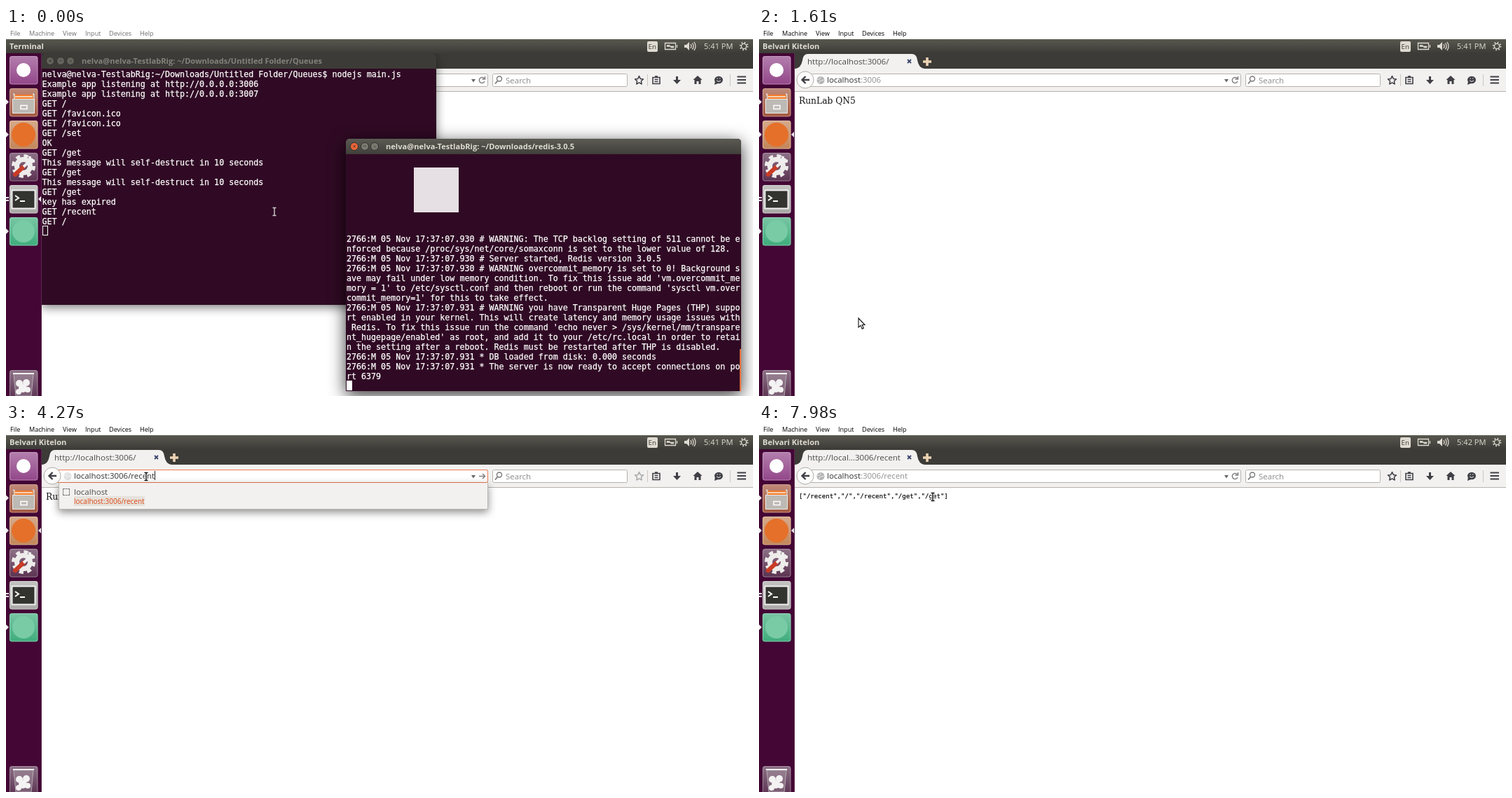
Recreate the animation shown at these times as an HTML page. Size 1066x525 px, loop 8 s.

```html
<!DOCTYPE html>
<html lang="en">
<head>
<meta charset="utf-8">
<title>Desktop session</title>
<style>
html, body { margin: 0; width: 100%; height: 100%; overflow: hidden; background: #fff; }
#stage { position: absolute; left: 0; top: 0; width: 1066px; height: 525px; overflow: hidden;
  font-family: "Open Sans", sans-serif; }
#stage > * { position: absolute; }
svg { left: 0; top: 0; display: block; }
.bold { font-weight: 700; }

.win { box-shadow: 0 4px 14px rgba(0,0,0,.5); background: #300a24; border-radius: 5px 5px 0 0; z-index: 1; }
.win.active { box-shadow: 0 6px 24px rgba(0,0,0,.8); z-index: 2; }
.bar { height: 22px; border-radius: 5px 5px 0 0; background: #3c3b37; color: #85827b;
  font: 700 11.1px/22px "Open Sans", sans-serif; white-space: pre; }
.active .bar { background: linear-gradient(#5b5a53, #403f3a); color: #dfdbd2; }
.bar span { position: absolute; left: 57px; top: 0; }
.bar i { position: absolute; top: 5px; width: 10px; height: 10px; border-radius: 50%;
  border: 1px solid #33322e; background: #65635c; font: 9px/9px "Open Sans", sans-serif;
  color: #33322e; text-align: center; }
.active .bar i { background: #7b7970; }
.active .bar i:first-child { background: #ee6637; }
pre { position: relative; top: 1px; margin: 0; color: #fff; font: 11.67px/14px "DejaVu Sans Mono", monospace;
  -webkit-text-stroke: .25px; }
.cur { position: absolute; left: 1px; width: 6px; height: 12px; border: 1px solid #fff; }
.active .cur { background: #fff; }
.scroll { position: absolute; right: 0; bottom: 0; width: 2px; background: #8d8078; }
.active .scroll { background: #e9713c; }
.logo { position: absolute; left: 97px; top: 41px; width: 64px; height: 64px; background: #e6e0e4; }

#url { left: 97px; top: 65px; font-size: 11.45px; line-height: 18px; white-space: pre; color: #333; }
#url.idle .rest { color: #8f8f8f; }
#caret { display: inline-block; width: 1px; height: 13px; background: #222; vertical-align: -2px; }
#page { left: 57px; top: 97px; white-space: pre; color: #000; font: 9.07px/12px "DejaVu Sans Mono", monospace;
  -webkit-text-stroke: .15px; }
#list { left: 75px; top: 84px; width: 611px; background: #f2f1f0;
  border: 1px solid #bbb7b1; border-top: 0; box-shadow: 0 4px 12px rgba(0,0,0,.45); }
.row { position: relative; height: 37px; color: #4c4c4c; font-size: 11.5px; white-space: pre; }
.row::before { content: ""; position: absolute; left: 5px; top: 8px; width: 8px; height: 8px; border: 1px dashed #777; }
.row b, .row em { position: absolute; left: 21px; font-weight: 400; font-style: normal; }
.row b { top: 4px; line-height: 18px; }
.row em { top: 19px; font-size: 10px; line-height: 14px; color: #dd4814; }
.row mark { color: inherit; background: #e6e1db; }
#shell, #pointer { z-index: 5; }
</style>
</head>
<body>
<div id="stage">

<svg id="browser" width="1066" height="525" fill="none">
  <path fill="#fff" d="M51 36H1066V525H51Z"/>
  <path fill="#3c3b37" d="M51 36H1066V58H51Z"/>
  <path fill="#f2f1f0" d="M51 58H1066V90H51Z"/>
  <path stroke="#b8b4ae" d="M51 90.5H1066"/>
  <path fill="#f2f1f0" d="M52 58Q60 57 62 46Q63 37 70 37H218Q225 37 226 46Q228 57 236 58Z"/>
  <g font-size="11.6" fill="#4c4c4c">
    <text x="69" y="51.5" data-on="0-4410">http://localhost:3006/</text>
    <text x="69" y="51.5" data-on="4410-8000">http://local…3006/recent</text>
  </g>
  <path stroke="#39456b" stroke-width="1.8" d="M212 45l5 5m0-5l-5 5"/>
  <path stroke="#ecd3b4" stroke-width="3.6" d="M240 42v12M234 48h12"/>
  <rect x="60.5" y="65.5" width="627" height="18" rx="2" fill="#fff" stroke="#b6b2ac"/>
  <rect x="60.5" y="65.5" width="627" height="18" rx="2" stroke="#ee7b54" data-on="2310-4340"/>
  <circle cx="66" cy="74" r="12" fill="#fbfbfa" stroke="#b0aca6"/>
  <path stroke="#3f3f45" stroke-width="2.4" d="M72 74H62M66.5 69L61.5 74L66.5 79"/>
  <g id="globe">
    <circle cx="88" cy="74.5" r="5.5" fill="#b4b4b4"/>
    <path stroke="#ececec" d="M83 73q4 2 5-3M86 79q-1-4 3-4t4-2"/>
  </g>
  <path fill="#666" d="M664 73h6l-3 4.5z"/>
  <g stroke="#828282" stroke-width="1.5">
    <path d="M682.5 72A4 4 0 1 0 683 76M683.5 69v4h-4" data-on="0-3010 4340-8000"/>
    <path d="M675 74.5h8M680 71l3.5 3.5l-3.5 3.5" data-on="3010-4340"/>
  </g>
  <rect x="694.5" y="65.5" width="192" height="18" rx="2" fill="#fff" stroke="#b6b2ac"/>
  <circle cx="704" cy="72.5" r="3.5" stroke="#777" stroke-width="1.4"/>
  <path stroke="#777" stroke-width="1.8" d="M701.5 75.5l-3.5 4"/>
  <text x="713" y="78.7" font-size="11.5" fill="#8c8c8c">Search</text>
  <path id="star" stroke="#3f3f45" stroke-width="1.5" stroke-linejoin="round"
    d="M903.5 68.5l1.8 3.9 4.2.5-3.1 2.9.8 4.2-3.7-2.1-3.7 2.1.8-4.2-3.1-2.9 4.2-.5z"/>
  <path stroke="#ccc8c2" d="M915.5 66v17M1033.5 66v17"/>
  <g stroke="#3f3f45" stroke-width="1.6">
    <path d="M923 70.5h10v9h-10zM925.5 73.5h5M925.5 76.5h5M926 69h4"/>
    <path stroke-width="2" d="M1043.5 69.5h12.5M1043.5 74h12.5M1043.5 78.5h12.5"/>
  </g>
  <g fill="#3f3f45">
    <path d="M956 69h3v5h4l-5.5 6l-5.5-6h4z"/>
    <path d="M987 68l6.5 6h-2v6h-3v-4h-3v4h-3v-6h-2z"/>
    <ellipse cx="1017" cy="74" rx="6" ry="5.2"/><path d="M1012 76l-1 5l5-2z"/>
  </g>
  <path stroke="#f2f1f0" d="M1014 75q3 3 6 0M1014.5 72h1.5M1018 72h1.5"/>
  <text x="57" y="108" font-size="12.25" fill="#111" style="font-family:'DejaVu Serif',serif" data-on="0-4410">RunLab QN5</text>
</svg>
<div id="url"><span>localhost</span><span class="rest">:3006</span><span class="rest" id="path"></span><span id="caret" data-on="2310-4340"></span></div>
<div id="page" data-on="4410-8000">["/recent","/","/recent","/get","/get"]</div>
<div id="list" data-on="3080-4340"></div>

<div class="win" id="queue" style="left:51px;top:36px;width:563px;height:359px" data-on="0-1610">
  <div class="bar"><span>nelva@nelva-TestlabRig: ~/Downloads/Untitled Folder/Queues</span></div>
  <pre style="padding-left:.5px">nelva@nelva-TestlabRig:~/Downloads/Untitled Folder/Queues$ nodejs main.js
Example app listening at http://0.0.0.0:3006
Example app listening at http://0.0.0.0:3007
GET /
GET /favicon.ico
GET /favicon.ico
GET /set
OK
GET /get
This message will self-destruct in 10 seconds
GET /get
This message will self-destruct in 10 seconds
GET /get
key has expired
GET /recent
GET /</pre>
  <div class="cur" style="top:246px" data-on="0-1470"></div>
  <div class="scroll" style="height:159px" data-on="910-1610"></div>
</div>

<div class="win" id="redis" style="left:485px;top:158px;width:564px;height:360px" data-on="0-1610">
  <div class="bar"><span>nelva@nelva-TestlabRig: ~/Downloads/redis-3.0.5</span></div>
  <div class="logo"></div>
  <pre style="padding:113px 0 0 1px">2766:M 05 Nov 17:37:07.930 # WARNING: The TCP backlog setting of 511 cannot be e
nforced because /proc/sys/net/core/somaxconn is set to the lower value of 128.
2766:M 05 Nov 17:37:07.930 # Server started, Redis version 3.0.5
2766:M 05 Nov 17:37:07.930 # WARNING overcommit_memory is set to 0! Background s
ave may fail under low memory condition. To fix this issue add 'vm.overcommit_me
mory = 1' to /etc/sysctl.conf and then reboot or run the command 'sysctl vm.over
commit_memory=1' for this to take effect.
2766:M 05 Nov 17:37:07.931 # WARNING you have Transparent Huge Pages (THP) suppo
rt enabled in your kernel. This will create latency and memory usage issues with
 Redis. To fix this issue run the command 'echo never &gt; /sys/kernel/mm/transpare
nt_hugepage/enabled' as root, and add it to your /etc/rc.local in order to retai
n the setting after a reboot. Redis must be restarted after THP is disabled.
2766:M 05 Nov 17:37:07.931 * DB loaded from disk: 0.000 seconds
2766:M 05 Nov 17:37:07.931 * The server is now ready to accept connections on po
rt 6379</pre>
  <div class="cur" style="top:345px"></div>
  <div class="scroll" style="height:60px"></div>
</div>

<svg id="shell" width="1066" height="525" fill="none">
  <defs>
    <linearGradient id="panel" x2="0" y2="1"><stop stop-color="#59584f"/><stop offset="1" stop-color="#3c3b37"/></linearGradient>
    <linearGradient id="gloss" x2="0" y2="1"><stop stop-color="#fff" stop-opacity=".3"/><stop offset="1" stop-color="#fff" stop-opacity="0"/></linearGradient>
  </defs>
  <path fill="#fff" d="M0 0H1066V16H0Z"/>
  <g id="menu" font-size="9.1">
    <text x="6" y="11">File</text><text x="33" y="11">Machine</text><text x="81" y="11">View</text>
    <text x="113" y="11">Input</text><text x="147" y="11">Devices</text><text x="191" y="11">Help</text>
  </g>
  <path fill="url(#panel)" d="M0 16H1066V36H0Z"/>
  <g fill="#dfdbd2" font-size="11.1">
    <text class="bold" x="5" y="30" data-on="0-1610">Terminal</text>
    <text class="bold" x="5" y="30" data-on="1610-8000">Belvari Kitelon</text>
    <text x="996" y="30" data-on="0-7560">5:41 PM</text>
    <text x="996" y="30" data-on="7560-8000">5:42 PM</text>
    <rect x="915" y="19" width="15" height="15" rx="2"/>
    <text x="916.5" y="30" font-size="9.8" style="fill:#3c3b37">En</text>
    <path d="M968 24h3l4-4v12l-4-4h-3z"/>
  </g>
  <g stroke="#dfdbd2" stroke-width="1.3">
    <path d="M940.5 21.5h15v9h-15zM957.5 24v4"/>
    <path fill="#dfdbd2" stroke-width=".6" d="M943 24.5h4l1 1.5h5v2h-4l-1-1.5h-5z"/>
    <path d="M977 23q2 3 0 6M979.5 21.5q3 4.5 0 9M982 20q4 6 0 12"/>
    <circle cx="1053" cy="26" r="3.6"/>
    <circle cx="1053" cy="26" r="5.3" stroke-width="2" stroke-dasharray="1.6 2.56"/>
  </g>
  <path fill="#430635" d="M0 36H51V525H0Z"/>
  <path stroke="#5d2950" d="M50.5 36V525"/>
  <g id="tiles"></g>

  <circle cx="25" cy="60" r="10" fill="#fff"/>

  <path fill="#f47b2c" d="M12 95h27v8H12z"/>
  <path fill="#f5d2b0" d="M13 97h25v2H13z"/>
  <path fill="#bdb9b4" stroke="#eceae7" d="M9.5 101.5h31v20h-31zM10 94h2v8M38 94h2v8"/>
  <path stroke="#fff" stroke-width="1.5" d="M21 110.5h9v5h-9z"/>

  <circle cx="25" cy="152" r="17" fill="#e5702a"/>

  <circle cx="25" cy="197" r="9.5" stroke="#eeeceb" stroke-width="7"/>
  <circle cx="25" cy="197" r="14.5" stroke="#eeeceb" stroke-width="5" stroke-dasharray="6 5.39"/>
  <path stroke="#c93b25" stroke-width="6" stroke-linecap="round" d="M13 209L25 198"/>
  <path stroke="#efefef" stroke-width="4" d="M25 198L36 188M34 183q-1 6 7 7"/>

  <rect x="8.5" y="231.5" width="33" height="26" fill="#33332f" stroke="#f0f0f0" stroke-width="2"/>
  <path stroke="#fff" stroke-width="2" d="M13 239l5 3.5l-5 3.5M20 247h7"/>

  <circle cx="25" cy="290" r="16" fill="#78cba5"/>

  <path fill="#b9b4b7" fill-opacity=".3" stroke="#b5a9b2" d="M11 493h28l-3 32H14z"/>
  <g fill="#f4f2f3"><circle cx="19" cy="507" r="5"/><circle cx="29" cy="506" r="5"/><circle cx="24" cy="514" r="6"/><circle cx="31" cy="516" r="4"/><circle cx="18" cy="519" r="4"/></g>
  <path stroke="#fff" stroke-width="2" d="M10 493h30"/>

  <path fill="#eee" d="M0 101.5l4 4l-4 4zM0 148l4 4l-4 4zM0 286l4 4l-4 4zM0 241h4v2H0zM0 245h4v2H0z"/>
  <path fill="#eee" d="M50 240l-4 4l4 4z" data-on="0-1610"/>
  <path fill="#eee" d="M50 148l-4 4l4 4z" data-on="1610-8000"/>
</svg>

<svg id="pointer" width="1066" height="525" fill="none">
  <g id="mouse">
    <path id="arrow" fill="#fff" stroke="#111" stroke-width="1.1" d="M0 0V13L3 10.3L5.2 15.3L7.3 14.3L5.2 9.5H9Z"/>
    <g id="beam">
      <path id="halo" stroke="#fff" stroke-width="3.4" d="M-3 -5.5H3M-3 5.5H3M0 -6V6"/>
      <path id="stem" stroke-width="1.4" d="M-2.5 -5.5H2.5M-2.5 5.5H2.5M0 -5.5V5.5"/>
    </g>
  </g>
</svg>
</div>

<script>
const LOOP = 8000, STEP = 70;
const $ = id => document.getElementById(id);

$('tiles').innerHTML = [[40, '#93478a'], [86, '#a4583f'], [132, '#c4865a'], [178, '#5c3453'],
  [224, '#aaa9a7'], [270, '#3fad7d'], [488, '#5c3453']].map(([y, color]) =>
  `<rect x="5" y="${y}" width="40.5" height="40.5" rx="3" fill="${color}"/>
   <rect x="5.5" y="${y + .5}" width="39.5" height="39.5" rx="3" fill="url(#gloss)" stroke="#fff" stroke-opacity=".35"/>`).join('');

for (const bar of document.querySelectorAll('.bar'))
  bar.insertAdjacentHTML('afterbegin', ['×', '−', '▫'].map((sign, i) =>
    `<i style="left:${6 + i * 14.7}px">${sign}</i>`).join(''));

const timed = [...document.querySelectorAll('[data-on]')].map(el => ({
  el, spans: el.dataset.on.split(' ').map(s => s.split('-').map(Number))
}));

const keyTimes = [3010, 3360, 3500, 3710, 3850, 3990, 4130];
const typedAt = t => '/recent'.slice(0, keyTimes.filter(k => t >= k).length);

// time, x, y
const track = [
  [0, 383, 262], [840, 222, 270], [910, 220, 270], [1470, 142, 414], [1610, 142, 414],
  [2170, 200, 75], [5110, 200, 75], [5460, 328, 106], [5880, 44, 102], [5950, 43, 104],
  [6230, 150, 124], [6440, 326, 104], [6580, 230, 86], [6790, 91, 105], [6930, 91, 105],
  [7070, 115, 105], [7140, 115, 105], [7980, 248, 104], [8000, 248, 104]
];

function mouseAt(t) {
  const i = track.findIndex(p => p[0] > t);
  const [t0, x0, y0] = track[i - 1], [t1, x1, y1] = track[i];
  const u = (t - t0) / (t1 - t0), e = u * u * (3 - 2 * u);
  return [x0 + (x1 - x0) * e, y0 + (y1 - y0) * e];
}

function drawMouse(t) {
  const [x, y] = mouseAt(t);
  const inTerminal = t < 1610 && y < 395;
  const overText = x > 55 && (y > 65 && y < 84 || t >= 4410 && y > 95 && y < 113);
  const beam = inTerminal || t >= 1610 && overText;
  $('mouse').setAttribute('transform', `translate(${Math.round(x)} ${Math.round(y)})`);
  $('arrow').style.display = beam ? 'none' : '';
  $('beam').style.display = beam ? '' : 'none';
  $('halo').style.display = inTerminal ? 'none' : '';
  $('stem').style.stroke = inTerminal ? '#ccc' : '#111';
}

let listKey = '';
function drawList(t) {
  const pages = t < 3360 ? ['/recent', '/', '/get', '/set'] : ['/recent'];
  const match = typedAt(t - STEP);
  const key = pages.length + match;
  if (key === listKey) return;
  listKey = key;
  $('list').innerHTML = pages.map(p => {
    const hit = p.startsWith(match) ? match : '';
    return `<div class="row"><b>localhost</b><em><mark>localhost:3006${hit}</mark>${p.slice(hit.length)}</em></div>`;
  }).join('');
}

function render(now) {
  const t = now % LOOP, step = Math.floor(t / STEP) * STEP;
  for (const { el, spans } of timed)
    el.style.display = spans.some(([a, b]) => t >= a && t < b) ? '' : 'none';

  $('queue').classList.toggle('active', t >= 910);
  $('redis').classList.toggle('active', t < 910);
  $('menu').style.fill = t < 910 ? '#6d6d6d' : '#000';

  const editing = t >= 3010 && t < 4340;
  $('url').className = t >= 2310 && t < 4340 ? '' : 'idle';
  $('path').textContent = typedAt(t);
  $('star').style.opacity = $('globe').style.opacity = editing ? .4 : 1;

  drawList(step);
  drawMouse(step);
  requestAnimationFrame(render);
}
render(0);
</script>
</body>
</html>
```
